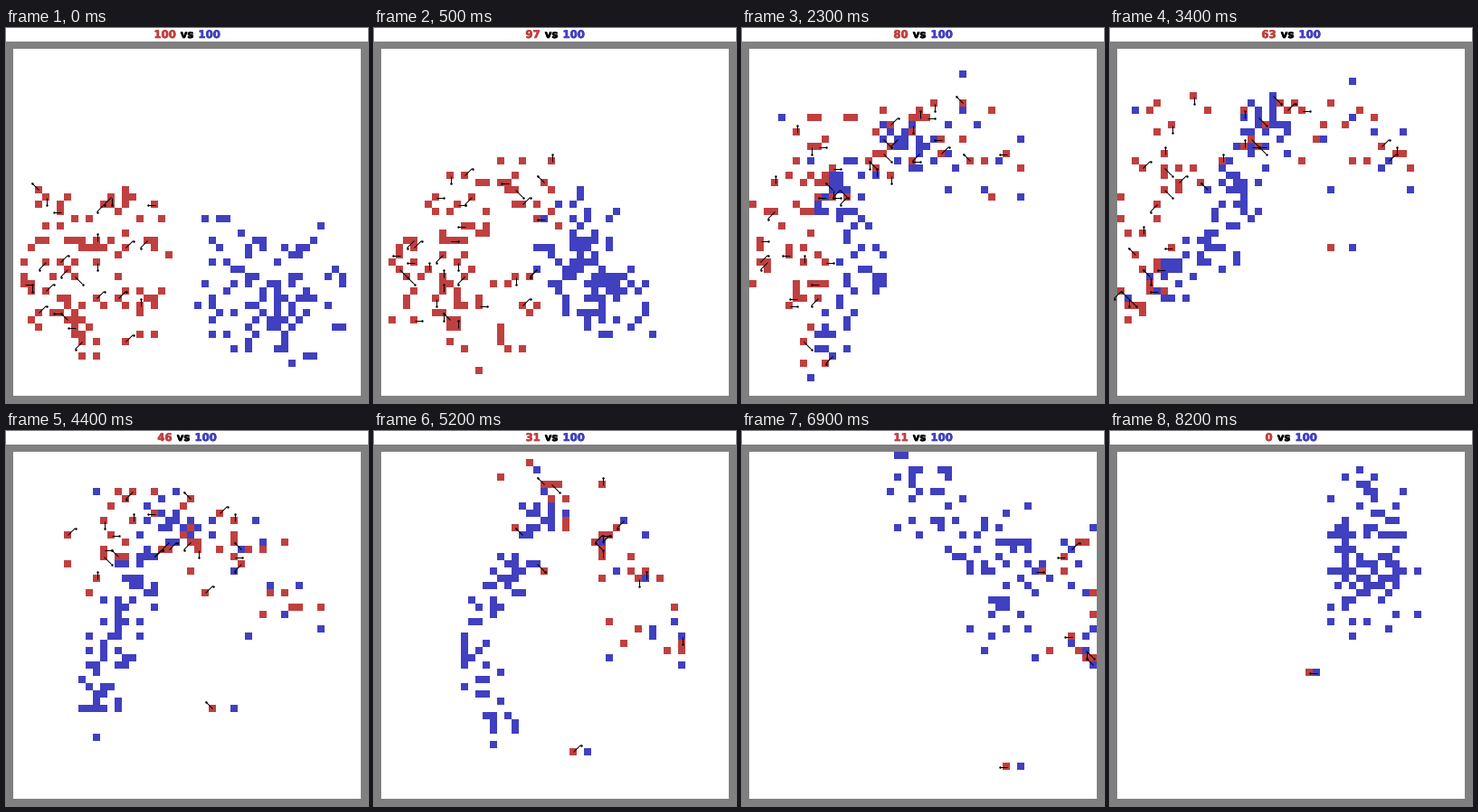
Animation, 400 px wide and 415 px high, one loop 8.3 s. Source, as a matplotlib script:

```python
import itertools

import matplotlib.pyplot as plt
import numpy as np
from matplotlib import patheffects
from matplotlib.animation import FuncAnimation
from matplotlib.collections import LineCollection

W, H, DPI = 400, 415, 80
CELL, GRID, LEFT, TOP, HEADER = 8, 48, 8, 23, 15
FRAMES, INTERVAL = 83, 100
UNITS, HUNTERS = 100, 15
RED, BLUE = "#c04040", "#4040c0"
RED_RGB, BLUE_RGB = (192, 64, 64), (64, 64, 192)
COMPASS = [d for d in itertools.product((-1, 0, 1), repeat=2) if any(d)]

rng = np.random.default_rng(7)
clock = np.arange(FRAMES)

# Turning points of the battle: reds left, and the bent line each army lies along
TIMES = [0, 11, 23, 34, 52, 69, 82]
REDS_LEFT = [100, 92, 80, 63, 31, 11, 0]
RED_LINE = [
    [(16, 37), (5, 36), (6, 24), (18, 24)],
    [(17, 42), (6, 32), (11, 22), (26, 12)],
    [(6, 43), (4, 30), (9, 13), (34, 12)],
    [(2, 44), (1, 36), (6, 11), (38, 12)],
    [(1, 20), (5, 4), (24, 4), (38, 24)],
    [(30, 2), (38, 3), (42, 4), (44, 26)],
    [(38, 8), (38, 10), (38, 14), (40, 20)],
]
BLUE_LINE = [
    [(30, 26), (32, 38), (40, 36), (40, 27)],
    [(26, 17), (19, 25), (24, 31), (22, 42)],
    [(28, 12), (10, 18), (17, 29), (9, 42)],
    [(22, 8), (16, 19), (14, 26), (4, 33)],
    [(24, 6), (17, 16), (12, 26), (17, 39)],
    [(21, 2), (31, 12), (37, 14), (34, 23)],
    [(35, 6), (34, 12), (34, 16), (34, 21)],
]
RED_REACH = [5, 5, 5, 5, 5, 4, 3]
BLUE_REACH = [5, 4, 3, 3, 2, 4, 4.5]
STRAGGLER = [(20, 23), (27, 14), (33, 20), (29, 27), (26, 41), (35, 43), (26, 30)]


def over_time(keys):
    """Blend key values to one row per frame."""
    flat = np.reshape(keys, (len(TIMES), -1))
    return np.array([np.interp(clock, TIMES, col) for col in flat.T]).T


def march(line, reach, rank):
    """Units keep their rank along the moving line, with their own offset and sway."""
    bends = over_time(line).reshape(FRAMES, 4, 2)
    knots = np.linspace(0, 1, 4)
    place = np.array([[np.interp(rank, knots, b[:, k]) for k in (0, 1)] for b in bends])
    offset = rng.uniform(-1, 1, (UNITS, 2)) * over_time(reach)[:, :, None]
    turns, phase = rng.uniform(3, 8, (UNITS, 2)), rng.random((UNITS, 2))
    sway = np.sin(2 * np.pi * (turns * clock[:, None, None] / FRAMES + phase))
    return place.transpose(0, 2, 1) + offset + sway


def to_cells(pos):
    return np.clip(np.rint(pos), 0, GRID - 1).astype(int)


# Reds fall in order of their number, mostly from the low end of the line
left = np.ceil(np.interp(clock, TIMES, REDS_LEFT))
death = np.array([np.argmax(left < UNITS - k) for k in range(UNITS)])
order = np.arange(UNITS) / UNITS + rng.normal(0, 0.15, UNITS)
red = march(RED_LINE, RED_REACH, order.argsort().argsort() / (UNITS - 1))
red[:, -1] = over_time(STRAGGLER)
blue = march(BLUE_LINE, BLUE_REACH, rng.random(UNITS))

# A falling red drifts next to the nearest blue
for k in range(UNITS - HUNTERS):
    t = death[k]
    body = blue[t, HUNTERS:]
    foe = body[np.abs(body - red[t, k]).max(1).argmin()]
    beside = foe - np.sign(foe - red[t, k])
    pull = np.clip(1 - (t - clock) / 10, 0, 1) * (clock <= t)
    red[:, k] += pull[:, None] * (beside - red[t, k])
red = np.clip(red, 0, GRID - 1)

# Hunters close in on the last reds, then rejoin their army
for j in range(HUNTERS):
    prey = UNITS - HUNTERS + j
    t = death[prey]
    gap = 1 + 4 * np.clip(1 - clock / t, 0, 1)
    chase = red[:, prey] + gap[:, None] * COMPASS[j % len(COMPASS)]
    zeal = np.clip(np.minimum(clock / 15, 1 + (t - clock) / 12), 0, 1)[:, None]
    blue[:, j] += zeal * (chase - blue[:, j])

red, blue = to_cells(red), to_cells(blue)

arena = np.full((H, W, 3), 255, np.uint8)
arena[HEADER:] = 128
field = np.s_[TOP:TOP + GRID * CELL, LEFT:LEFT + GRID * CELL]

fig = plt.figure(figsize=(W / DPI, H / DPI), dpi=DPI, facecolor="white")
stage = fig.figimage(arena)
ax = fig.add_axes([0, 0, 1, 1], zorder=1)
ax.set(xlim=(0, W), ylim=(H, 0))
ax.axis("off")
sticks = ax.add_collection(LineCollection([], colors="black", linewidths=0.9, zorder=3))
tips = ax.scatter([], [], s=5, c="black", linewidths=0, zorder=4)


def label(text, color, align):
    return ax.text(W / 2, 11, text, color=color, ha=align, va="baseline",
                   family="DejaVu Sans", weight="bold", fontsize=10.5,
                   path_effects=[patheffects.withStroke(linewidth=0.6, foreground=color)])


red_label = label("", RED, "right")
vs_label = label("vs", "black", "center")
blue_label = label(str(UNITS), BLUE, "left")


def centre(cell):
    return LEFT + CELL * cell[0] + 4.5, TOP + CELL * cell[1] + 4.5


def swings(i):
    """Weapon strokes as (from cell, to cell)."""
    dice = np.random.default_rng(100 + i)
    out = []
    for unit in np.flatnonzero(death >= i):
        pos, dying = red[i, unit], death[unit] == i
        if dice.random() < 0.34 and not dying:
            out.append((pos, pos + dice.choice(COMPASS)))
        near = np.abs(blue[i] - pos).max(1) == 1
        for foe in blue[i][near]:
            if dying or dice.random() < 0.2:
                out.append((foe, pos))
    return out


def draw(i):
    cells = np.full((GRID, GRID, 3), 255, np.uint8)
    shown = red[i, death >= i]
    cells[blue[i, :, 1], blue[i, :, 0]] = BLUE_RGB
    cells[shown[:, 1], shown[:, 0]] = RED_RGB
    arena[field] = cells.repeat(CELL, 0).repeat(CELL, 1)
    stage.set_data(arena)

    lines = [(centre(p), centre(q)) for p, q in swings(i)]
    sticks.set_segments(lines)
    tips.set_offsets(np.array([q for _, q in lines]).reshape(-1, 2))

    number = str((death > i).sum())
    mid = W / 2 - 4 * (3 - len(number))
    red_label.set_text(number)
    red_label.set_x(mid - 12.5)
    vs_label.set_x(mid)
    blue_label.set_x(mid + 12.5)
    return stage, sticks, tips, red_label, vs_label, blue_label


anim = FuncAnimation(fig, draw, frames=FRAMES, interval=INTERVAL, repeat=True, repeat_delay=0)
plt.show()
```
